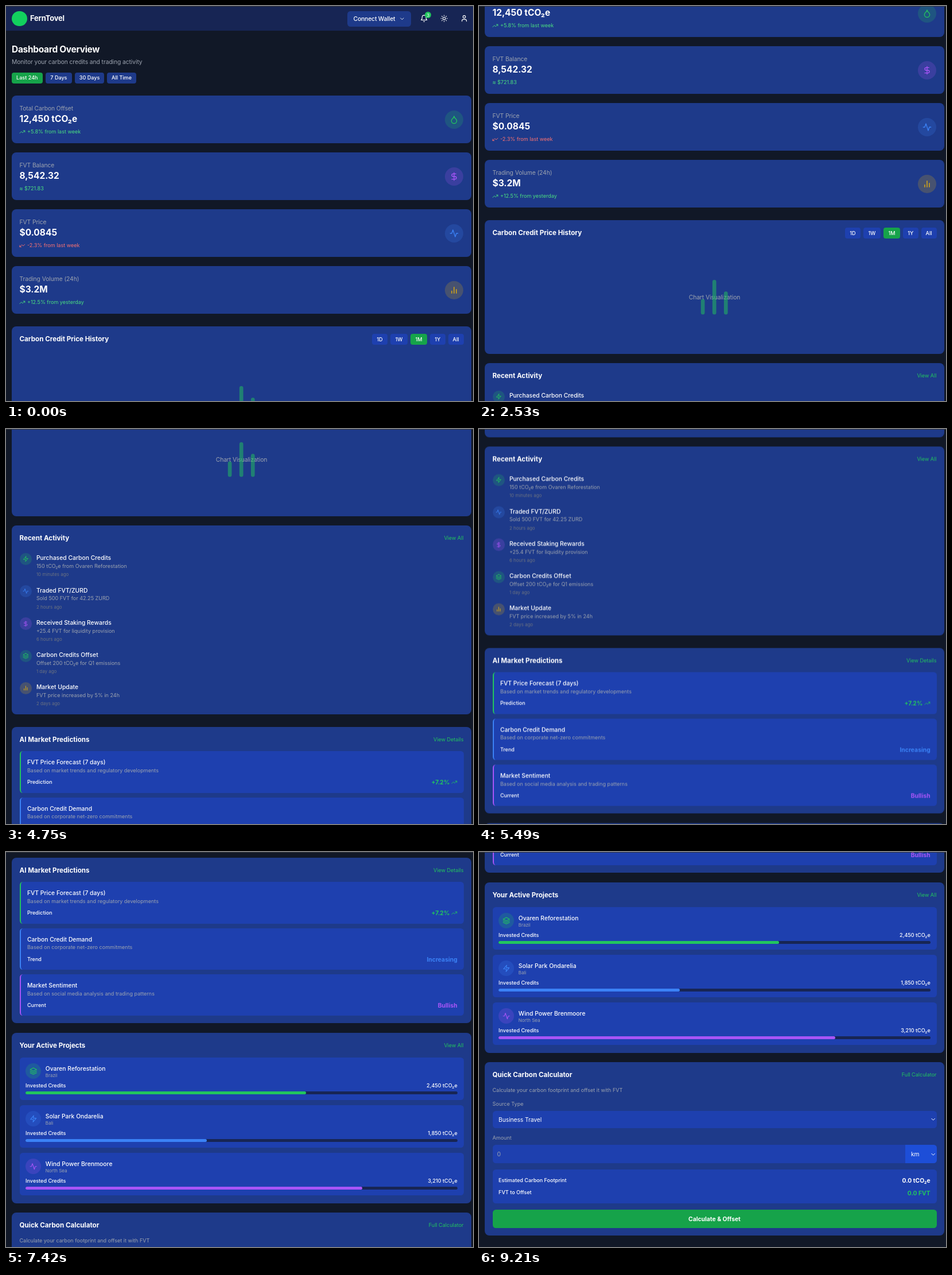
Recreate the animation shown at these times as an HTML page. Size 814 px wide and 688 px high, loop 9.81 s.

```html
<!DOCTYPE html>
<html lang="en">
<head>
<meta charset="utf-8">
<title>Dashboard</title>
<style>
  html, body { margin: 0; width: 100%; height: 100%; overflow: hidden; background: #111827; }
  #stage { position: relative; width: 814px; height: 688px; overflow: hidden; background: #111827; font-family: Inter, Roboto, sans-serif; }
  #page { position: absolute; left: 0; top: 0; width: 814px; height: 2098px; will-change: transform; }
  #edge { position: absolute; left: 0; top: 0; width: 814px; height: 1px; background: #33363d; }
  #page > * { position: absolute; }
  .t { line-height: 20px; height: 20px; white-space: pre; color: #fff; }
  .c { text-align: center; }
  .brand { font: 700 12.9px/20px Inter, sans-serif; letter-spacing: -.012em; }
  .h1 { font: 700 15.5px/20px Inter, sans-serif; letter-spacing: -.02em; }
  .num { font: 700 15.5px/20px Inter, sans-serif; }
  .h2 { font: 700 11.64px/20px Inter, sans-serif; }
  .h3 { font: 500 10.35px/20px Inter, sans-serif; }
  .val { font: 700 10.35px/20px Inter, sans-serif; }
  .body { font: 400 10.35px/20px Inter, sans-serif; letter-spacing: -.01em; }
  .sm { font: 400 9.05px/20px Inter, sans-serif; }
  .smb { font: 500 9.05px/20px Inter, sans-serif; }
  .xs { font: 400 7.95px/20px Inter, sans-serif; }
</style>
</head>
<body>
<div id="stage"><div id="page"></div><div id="edge"></div></div>
<script>
const page = document.getElementById('page');

const GREEN = '#22c55e', BLUE = '#3b82f6', PURPLE = '#a855f7', YELLOW = '#eab308';
const MINT = '#4ade80', RED = '#f87171', GRAY = '#9ca3af', DIM = '#6b7280', WHITE = '#fff';
const NAVY = '#172554', CARD = '#1e3a8a', PANEL = '#1e40af', ACTIVE = '#16a34a';
const LEFT = 23.5, RIGHT = 797.5, INNER = 786.7;
const COIN = 'FVT', STABLE = 'ZURD';

const PATHS = {
  chevron: 'M6 9l6 6 6-6',
  bell: 'M6 8a6 6 0 0 1 12 0c0 7 3 9 3 9H3s3-2 3-9M10.3 21a1.94 1.94 0 0 0 3.4 0',
  sun: 'M8 12a4 4 0 1 0 8 0a4 4 0 1 0-8 0M12 2v2M12 20v2M4.9 4.9l1.4 1.4M17.7 17.7l1.4 1.4M2 12h2M20 12h2M6.3 17.7l-1.4 1.4M19.1 4.9l-1.4 1.4',
  user: 'M19 21v-2a4 4 0 0 0-4-4H9a4 4 0 0 0-4 4v2M8 7a4 4 0 1 0 8 0a4 4 0 1 0-8 0',
  drop: 'M12 22a7 7 0 0 0 7-7c0-2-1-3.9-3-5.5s-3.5-4-4-6.5c-.5 2.5-2 4.9-4 6.5C6 11.1 5 13 5 15a7 7 0 0 0 7 7z',
  dollar: 'M12 2v20M17 5H9.5a3.5 3.5 0 0 0 0 7h5a3.5 3.5 0 0 1 0 7H6',
  pulse: 'M22 12h-4l-3 9L9 3l-3 9H2',
  bars: 'M18 20V10M12 20V4M6 20v-6',
  up: 'M22 7l-8.5 8.5-5-5L2 17M16 7h6v6',
  down: 'M2 17l8.5-8.5 5 5L22 7M8 17H2v-6',
  zap: 'M13 2L3 14h9l-1 8 10-12h-9l1-8z',
  layers: 'M12 2L2 7l10 5 10-5-10-5zM2 17l10 5 10-5M2 12l10 5 10-5'
};

function add(css, cls = '', str = '') {
  const el = document.createElement('div');
  el.className = cls;
  el.style.cssText = css;
  el.textContent = str;
  page.append(el);
  return el;
}

const box = (x, y, w, h, bg, r = 0, extra = '') =>
  add(`left:${x}px;top:${y}px;width:${w}px;height:${h}px;background:${bg};border-radius:${r}px;${extra}`);
const card = (y, h) => box(10, y, 800.7, h, CARD, 8);
const disc = (cx, cy, r, bg) => box(cx - r, cy - r, 2 * r, 2 * r, bg, r);

// y is the vertical centre of the line
const text = (x, y, cls, str, color = WHITE) =>
  add(`left:${x}px;top:${y - 10}px;color:${color}`, 't ' + cls, str);
const textR = (x, y, cls, str, color = WHITE) =>
  add(`right:${814 - x}px;top:${y - 10}px;color:${color}`, 't ' + cls, str);
const textC = (x, w, y, cls, str, color = WHITE) =>
  add(`left:${x}px;width:${w}px;top:${y - 10}px;color:${color}`, 't c ' + cls, str);

function icon(name, cx, cy, size, color, opacity = 1) {
  const el = add(`left:${cx - size / 2}px;top:${cy - size / 2}px;width:${size}px;height:${size}px;opacity:${opacity}`);
  el.innerHTML = `<svg style="display:block" width="${size}" height="${size}" viewBox="0 0 24 24" fill="none" ` +
    `stroke="${color}" stroke-width="2" stroke-linecap="round" stroke-linejoin="round"><path d="${PATHS[name]}"/></svg>`;
}

function badge(name, cx, cy, r, size, color) {
  disc(cx, cy, r, color + '33');
  icon(name, cx, cy, size, color);
}

function chip(x, x2, y, label, bg) {
  box(x, y, x2 - x, 18.7, bg, 4);
  textC(x, x2 - x, y + 9.3, 'smb', label);
}

function cardHead(y, title, link) {
  text(LEFT, y + 22.3, 'h2', title);
  if (link) textR(RIGHT, y + 22.3, 'sm', link, GREEN);
}

function header() {
  box(0, 0, 814, 43.3, NAVY);
  disc(23.5, 22, 13.4, '#12d05e');
  text(42, 22, 'brand', 'FernTovel');
  box(595, 9, 111.3, 26.6, CARD, 5.4);
  text(605.5, 22, 'h3', 'Connect Wallet').style.letterSpacing = '-.015em';
  icon('chevron', 690, 22, 10.7, WHITE);
  icon('bell', 729, 22, 13.4, WHITE);
  disc(735.6, 15.5, 5.4, GREEN);
  textC(730, 11.2, 15.5, 'xs', '3');
  icon('sun', 764, 22, 13.4, WHITE);
  icon('user', 798.6, 22, 13.4, WHITE);
}

function overview() {
  text(10, 76, 'h1', 'Dashboard Overview');
  text(10, 97.3, 'body', 'Monitor your carbon credits and trading activity', GRAY);
  chip(10, 63.6, 116, 'Last 24h', ACTIVE);
  chip(69, 114.8, 116, '7 Days', CARD);
  chip(120, 171, 116, '30 Days', CARD);
  chip(176, 227, 116, 'All Time', CARD);

  [['Total Carbon Offset', '12,450 tCO₂e', '+5.8% from last week', 'up', MINT, 'drop', GREEN],
   [COIN + ' Balance', '8,542.32', '≈ $721.83', '', MINT, 'dollar', PURPLE],
   [COIN + ' Price', '$0.0845', '-2.3% from last week', 'down', RED, 'pulse', BLUE],
   ['Trading Volume (24h)', '$3.2M', '+12.5% from yesterday', 'up', MINT, 'bars', YELLOW]
  ].forEach(([label, value, note, trend, tone, pic, color], i) => {
    const y = 156 + 99.1 * i;
    card(y, 82.9);
    text(LEFT, y + 21.5, 'body', label, GRAY);
    text(LEFT, y + 40.6, 'num', value);
    if (trend) icon(trend, 28.8, y + 63, 10.7, tone);
    text(trend ? 36.9 : LEFT, y + 63, 'sm', note, tone);
    badge(pic, 781, y + 41.5, 16, 16, color);
  });
}

function chart(y) {
  card(y, 232.5);
  cardHead(y, 'Carbon Credit Price History');
  [['1D', 638, 665], ['1W', 670, 700], ['1M', 705, 734], ['1Y', 739, 765.6], ['All', 770.5, 797.5]]
    .forEach(([label, x, x2]) => chip(x, x2, y + 13.2, label, label === '1M' ? ACTIVE : PANEL));
  textC(310, 201, y + 134, 'body', 'Chart Visualization', GRAY);
  icon('bars', 410.5, y + 133.8, 80.4, GREEN, .5);
}

function activity(y) {
  card(y, 329);
  cardHead(y, 'Recent Activity', 'View All');
  [['Purchased Carbon Credits', '150 tCO₂e from Ovaren Reforestation', '10 minutes ago', 'zap', GREEN],
   [`Traded ${COIN}/${STABLE}`, `Sold 500 ${COIN} for 42.25 ${STABLE}`, '2 hours ago', 'pulse', BLUE],
   ['Received Staking Rewards', `+25.4 ${COIN} for liquidity provision`, '6 hours ago', 'dollar', PURPLE],
   ['Carbon Credits Offset', 'Offset 200 tCO₂e for Q1 emissions', '1 day ago', 'layers', GREEN],
   ['Market Update', COIN + ' price increased by 5% in 24h', '2 days ago', 'bars', YELLOW]
  ].forEach(([title, sub, when, pic, color], i) => {
    const top = y + 56.28 * i;
    badge(pic, 34.2, top + 58.5, 10.7, 10.7, color);
    text(52.9, top + 56.3, 'h3', title);
    text(52.9, top + 71, 'sm', sub, GRAY);
    text(52.9, top + 85.3, 'xs', when, DIM);
  });
}

function predictions(y) {
  card(y, 288.5);
  cardHead(y, 'AI Market Predictions', 'View Details');
  [[COIN + ' Price Forecast (7 days)', 'market trends and regulatory developments', 'Prediction', '+7.2%', GREEN],
   ['Carbon Credit Demand', 'corporate net-zero commitments', 'Trend', 'Increasing', BLUE],
   ['Market Sentiment', 'social media analysis and trading patterns', 'Current', 'Bullish', PURPLE]
  ].forEach(([title, basis, label, value, color], i) => {
    const top = y + 42.7 + 80.35 * i;
    box(LEFT, top, 774, 72.4, PANEL, 5.4, `box-sizing:border-box;border-left:2.7px solid ${color}`);
    text(36.9, top + 19, 'h3', title);
    text(36.9, top + 33.7, 'sm', 'Based on ' + basis, GRAY);
    text(36.9, top + 54, 'smb', label);
    textR(i ? INNER : 773.4, top + 54.2, 'val', value, color);
    if (!i) icon('up', 781.4, top + 54, 10.7, color);
  });
}

function projects(y) {
  card(y, 296.5);
  cardHead(y, 'Your Active Projects', 'View All');
  [['Ovaren Reforestation', 'Brazil', '2,450', .65, 'layers', GREEN],
   ['Solar Park Ondarelia', 'Bali', '1,850', .42, 'zap', BLUE],
   ['Wind Power Brenmoore', 'North Sea', '3,210', .78, 'pulse', PURPLE]
  ].forEach(([name, place, credits, share, pic, color], i) => {
    const top = y + 42.7 + 83 * i;
    box(LEFT, top, 774, 74.7, PANEL, 5.4);
    badge(pic, 47.5, top + 24, 13.4, 13.4, color);
    text(68.8, top + 19, 'h3', name);
    text(68.8, top + 31.6, 'xs', place, GRAY);
    text(34.1, top + 49.6, 'smb', 'Invested Credits');
    textR(INNER, top + 49.6, 'smb', credits + ' tCO₂e');
    box(34.1, top + 58.8, 752.6, 5.4, NAVY, 2.7);
    box(34.1, top + 58.8, 752.6 * share, 5.4, color, 2.7);
  });
}

function calculator(y) {
  card(y, 302.2);
  cardHead(y, 'Quick Carbon Calculator', 'Full Calculator');
  text(LEFT, y + 49.3, 'sm', `Calculate your carbon footprint and offset it with ${COIN}`, GRAY);
  text(LEFT, y + 73.3, 'sm', 'Source Type', GRAY);
  box(LEFT, y + 85.5, 774, 29.3, PANEL, 5.4);
  text(34.1, y + 100.2, 'body', 'Business Travel');
  icon('chevron', 791.8, y + 100.2, 11.4, WHITE);
  text(LEFT, y + 132.3, 'sm', 'Amount', GRAY);
  box(LEFT, y + 144.4, 719, 32.1, PANEL, '5.4px 0 0 5.4');
  text(31.5, y + 160.5, 'body', '0', GRAY);
  box(742.5, y + 144.4, 55, 32.1, '#1d4ed8', '0 5.4px 5.4px 0');
  text(753, y + 160.5, 'body', 'km');
  icon('chevron', 791.8, y + 160.5, 11.4, WHITE);
  box(LEFT, y + 187.3, 774, 58.8, PANEL, 5.4);
  text(34.1, y + 206.2, 'smb', 'Estimated Carbon Footprint');
  textR(INNER, y + 206.3, 'val', '0.0 tCO₂e');
  text(34.1, y + 227.5, 'smb', COIN + ' to Offset');
  textR(INNER, y + 227.6, 'val', '0.0 ' + COIN, GREEN);
  box(LEFT, y + 256.8, 774, 32.1, ACTIVE, 5.4);
  textC(LEFT, 774, y + 273, 'val', 'Calculate & Offset');
}

header();
overview();
chart(558);
activity(807);
predictions(1157.5);
projects(1463);
calculator(1775.9);

// Scroll runs: first step, last step (ms), step count, offset reached
const LOOP = 9810;
const RUNS = [
  [1350, 2380, 8, 168], [2530, 2530, 1, 185], [2830, 3270, 4, 465],
  [4010, 4010, 1, 501.5], [4160, 5040, 7, 694], [5190, 5490, 3, 776.5],
  [5630, 5630, 1, 802], [5930, 6370, 4, 932], [6670, 7420, 6, 1148],
  [7570, 7570, 1, 1178], [7720, 8020, 3, 1268], [8320, 8320, 1, 1299],
  [8470, 9210, 6, 1410]
];

function scrollAt(t) {
  let y = 0;
  for (const [from, to, n, end] of RUNS) {
    if (t < from) break;
    const gap = n > 1 ? (to - from) / (n - 1) : 1;
    const done = Math.min(n, Math.floor((t - from) / gap + 1e-6) + 1);
    y += (end - y) * done / n;
  }
  return y;
}

function draw() {
  page.style.transform = `translateY(${-scrollAt(performance.now() % LOOP)}px)`;
  requestAnimationFrame(draw);
}
draw();
</script>
</body>
</html>
```
